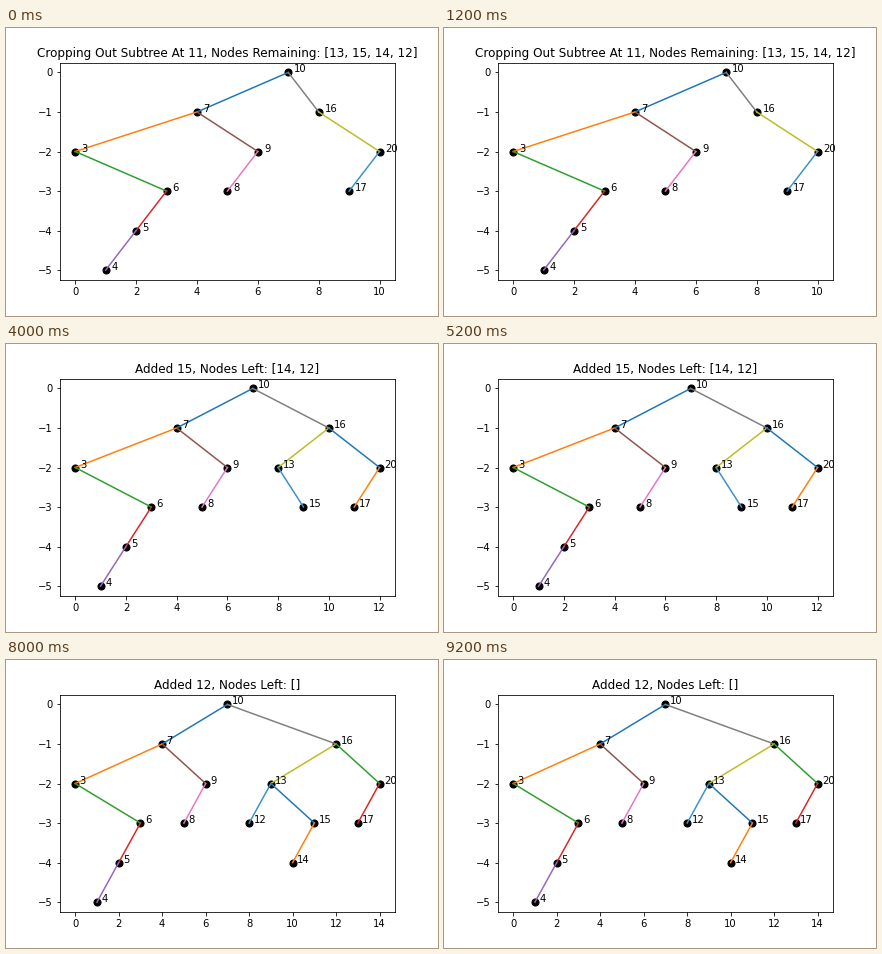
Recreate the animation shown at these times as a matplotlib script. Size 432 by 288 pixels, loop 10 s.

```python
import matplotlib.pyplot as plt
from matplotlib.animation import FuncAnimation

BASE = [10, 7, 3, 6, 5, 4, 9, 8, 16, 20, 17]
QUEUE = [13, 15, 14, 12]
COLORS = ["C0", "C1", "C2", "C3", "C4", "C5", "C6", "C7", "C8", "#3a92c8"]


def build(keys):
    """Insert keys into a binary search tree: {key: [left, right]}."""
    tree = {keys[0]: [None, None]}
    for key in keys[1:]:
        node = keys[0]
        while True:
            side = int(key > node)
            if tree[node][side] is None:
                break
            node = tree[node][side]
        tree[node][side] = key
        tree[key] = [None, None]
    return tree


def walk(tree, node, depth=0):
    """Yield (parent, child, child depth) in preorder."""
    for child in tree[node]:
        if child is not None:
            yield node, child, depth + 1
            yield from walk(tree, child, depth + 1)


def draw(step):
    ax.clear()
    keys = BASE + QUEUE[:step]
    left = QUEUE[step:]
    edges = list(walk(build(keys), keys[0]))
    depth = {keys[0]: 0, **{child: d for _, child, d in edges}}
    pos = {key: (i, -depth[key]) for i, key in enumerate(sorted(keys))}

    for i, (a, b, _) in enumerate(edges):
        ax.plot(*zip(pos[a], pos[b]), color=COLORS[i % len(COLORS)])
    ax.scatter(*zip(*pos.values()), s=50, color="black")
    for key, (x, y) in pos.items():
        ax.text(x + 0.2, y, str(key))

    if step:
        ax.set_title(f"Added {QUEUE[step - 1]}, Nodes Left: {left}")
    else:
        ax.set_title(f"Cropping Out Subtree At 11, Nodes Remaining: {left}")


fig, ax = plt.subplots(figsize=(6, 4), dpi=72)
fig.subplots_adjust(left=0.125, right=0.9, bottom=0.125, top=0.88)
anim = FuncAnimation(fig, draw, frames=len(QUEUE) + 1, interval=2000,
                     init_func=lambda: None, repeat=True, repeat_delay=0)
plt.show()
```
